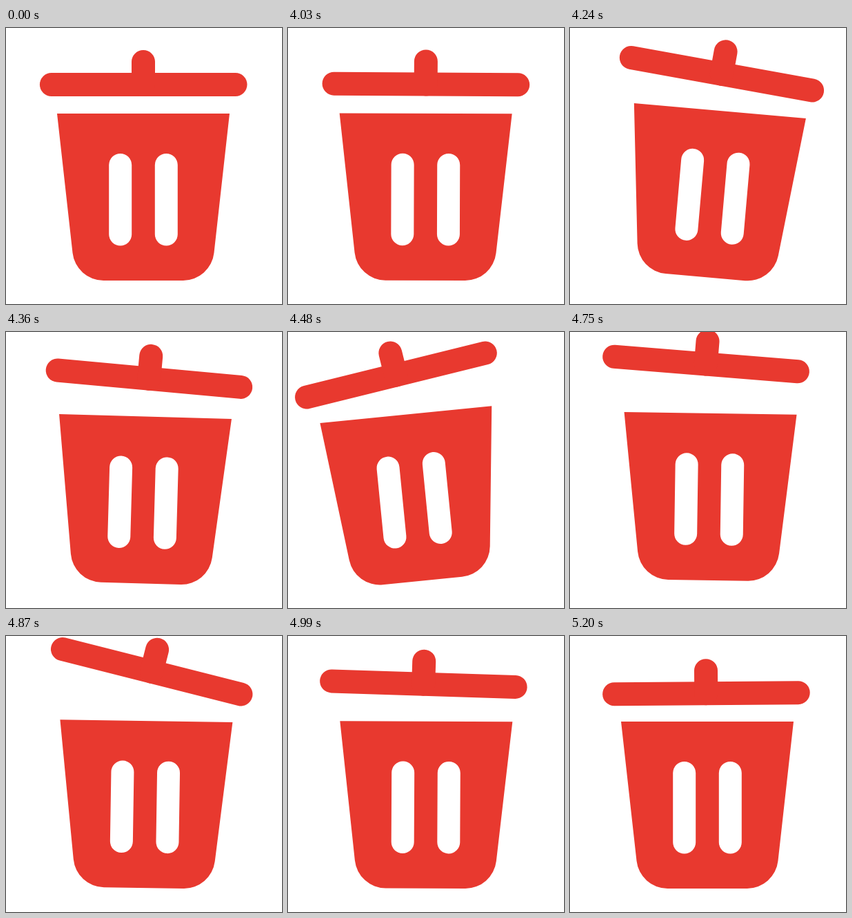
These frames come from a looping animation (400 px wide and 400 px high, 5260 ms). An HTML page with a canvas:

```html
<!DOCTYPE html>
<html lang="en">
<head>
<meta charset="utf-8">
<title>Bin</title>
<style>
  html, body { margin: 0; width: 100%; height: 100%; overflow: hidden; background: #fff; }
  canvas { display: block; }
</style>
</head>
<body>
<canvas id="stage" width="400" height="400"></canvas>
<script>
const ctx = document.getElementById('stage').getContext('2d');
const LOOP = 5260, REST = 4000, STEP = 30, LAST_STEP = 40;
const RED = '#e8392f';
const GROUND = 366, CENTER = 199, CORNER = 45;

// Each key: [step, value, ...]; angles in degrees.
const bodyAngle = [[0, 0], [9, 5.2], [17, -6.15], [21, -3.45], [26, 1.2], [29, 0.9], [36, 0], [40, 0]];
const bodyShift = [[0, 0], [9, -3.1], [16, -4.3], [21, 1.2], [29, 0.6], [36, 0], [40, 0]];
const lidX = [[0, 0], [8, 20.75], [10, 23.8], [16, -42.75], [17, -45], [18, -41.8], [21, -26.25],
  [29, 12], [35, -8], [40, -1.75]];
const lidY = [[0, 0], [8, -15.25], [10, -16.5], [13, -13.5], [16, -19.5], [18, -30], [21, -33.75],
  [25, -35.5], [29, -30.25], [35, -5], [40, 1.2]];
const lidAngle = [[0, 0], [8, 10.27], [10, 11.5], [16, -13.9], [17, -14.3], [21, -8.72],
  [29, 14.2], [35, -2.5], [40, -0.45]];

// Monotone cubic through the keys: flat at turning points and at both ends.
function sample(keys, x) {
  const rise = i => (keys[i + 1][1] - keys[i][1]) / (keys[i + 1][0] - keys[i][0]);
  const slope = i => {
    if (i === 0 || i === keys.length - 1) return 0;
    const a = rise(i - 1), b = rise(i);
    return a * b > 0 ? 2 * a * b / (a + b) : 0;
  };
  let i = 0;
  while (i < keys.length - 2 && x > keys[i + 1][0]) i++;
  const [x0, y0] = keys[i], [x1, y1] = keys[i + 1];
  const w = x1 - x0, s = (x - x0) / w, r = 1 - s;
  return y0 * r * r * (1 + 2 * s) + y1 * s * s * (1 + 2 * r)
    + w * s * r * (slope(i) * r - slope(i + 1) * s);
}

const radians = degrees => degrees * Math.PI / 180;

function roundLine(x0, y0, x1, y1, width, color) {
  ctx.lineCap = 'round';
  ctx.lineWidth = width;
  ctx.strokeStyle = color;
  ctx.beginPath();
  ctx.moveTo(x0, y0);
  ctx.lineTo(x1, y1);
  ctx.stroke();
}

function hop(n) {
  const s = (n - 16) / 11;
  return s > 0 && s < 1 ? 36 * s * (1 - s) : 0;
}

function drawBody(n) {
  const angle = radians(sample(bodyAngle, n));
  // Lift that keeps the lower rounded corner on the ground while tilted.
  const lift = 58 * Math.sin(Math.abs(angle)) - CORNER * (1 - Math.cos(angle));
  ctx.save();
  ctx.translate(CENTER + sample(bodyShift, n), GROUND - lift - hop(n));
  ctx.rotate(angle);
  ctx.fillStyle = RED;
  ctx.beginPath();
  ctx.moveTo(-125, -242);
  ctx.arcTo(-98, 0, 0, 0, CORNER);
  ctx.arcTo(98, 0, 125, -242, CORNER);
  ctx.lineTo(125, -242);
  ctx.fill();
  for (const x of [-33.3, 33.3]) roundLine(x, -167.5, x, -67, 33, '#fff');
  ctx.restore();
}

function drawLid(n) {
  ctx.save();
  ctx.translate(CENTER + 0.2 + sample(lidX, n), 82 + sample(lidY, n));
  ctx.rotate(radians(sample(lidAngle, n)));
  roundLine(-133.3, 0, 133.3, 0, 34, RED);
  roundLine(-0.2, -33, -0.2, 0, 34, RED);
  ctx.restore();
}

const start = performance.now();

function frame() {
  const time = (performance.now() - start) % LOOP;
  const n = Math.min(LAST_STEP, Math.max(0, Math.floor((time - REST) / STEP)));
  ctx.fillStyle = '#fff';
  ctx.fillRect(0, 0, 400, 400);
  drawBody(n);
  drawLid(n);
  requestAnimationFrame(frame);
}
frame();
</script>
</body>
</html>
```
